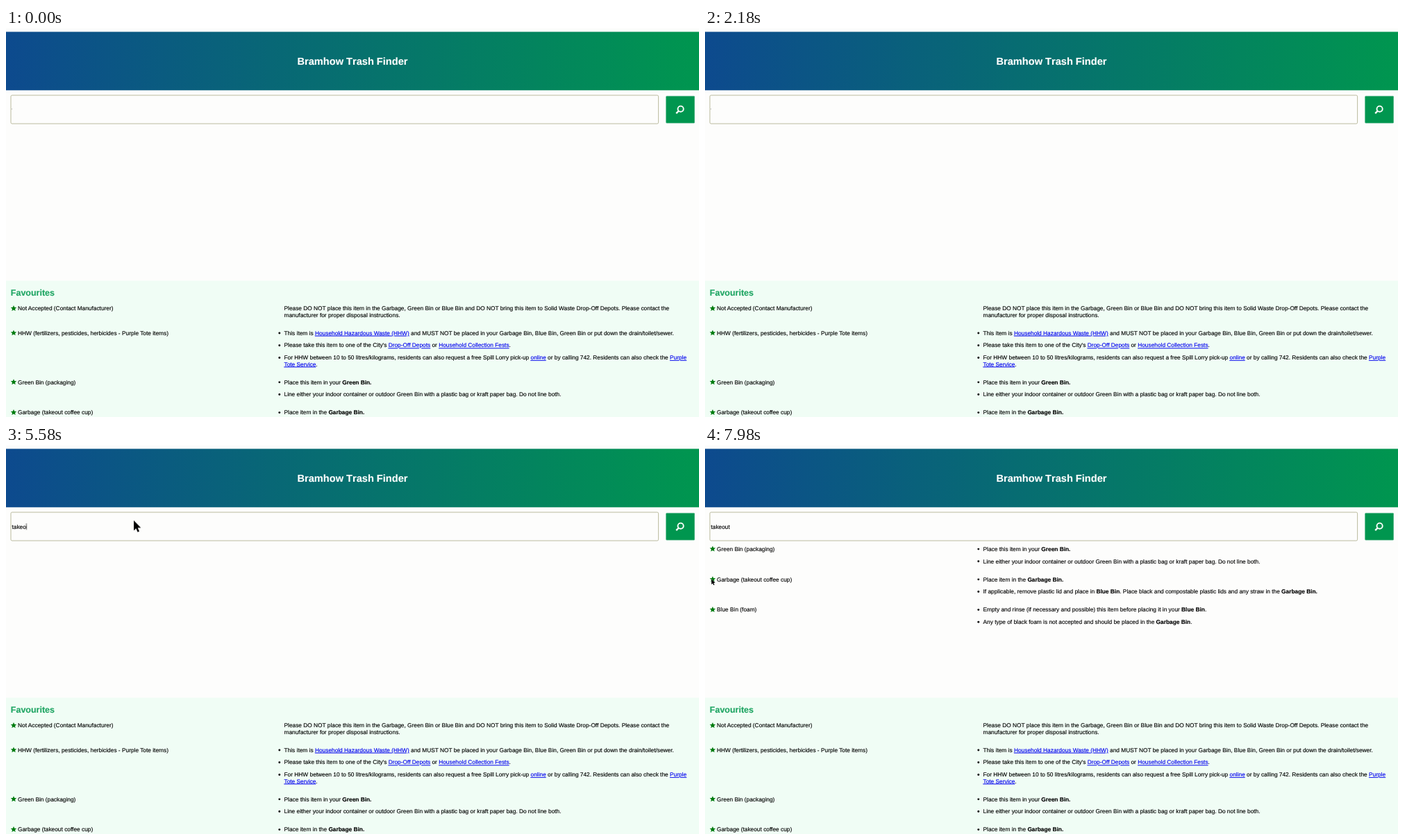
Write an HTML page that moves like this. It is 998 px wide and 561 px high and loops after 8000 ms.

```html
<!DOCTYPE html>
<html lang="en">
<head>
<meta charset="utf-8">
<title>Waste search</title>
<style>
  html, body { margin: 0; width: 100%; height: 100%; overflow: hidden; background: #fdfdfc; }
  svg { display: block; width: 998px; height: 561px; }
  text {
    font: 8.333px "Liberation Sans", Arial, sans-serif;
    text-rendering: geometricPrecision;
    white-space: pre;
    color: #000;
    fill: currentColor;
    stroke: currentColor;
    stroke-width: .14px;
  }
  tspan { fill: currentColor; stroke: currentColor; }
  .title, .heading { font-weight: bold; font-kerning: none; }
  .title { font-size: 14.6px; color: #fff; text-anchor: middle; }
  .heading { font-size: 12.5px; color: #1fa563; }
  .bold { font-weight: bold; }
  .link { color: #0000ee; text-decoration: underline; }
  .star { fill: #007c10; }

  #results { animation: results 8s step-end infinite; }
  #typing { animation: typing 8s step-end infinite; }
  #caret { animation: blink 8s step-end infinite; }
  #pointer { animation: move 8s ease-in-out infinite, show 8s step-end infinite; }

  @keyframes results { 0% { opacity: 0 } 78.75%, 100% { opacity: 1 } }

  /* each step is the advance width of the text typed so far */
  @keyframes typing {
    0% { transform: translateX(0) }
    50.5% { transform: translateX(2.4px) }
    54.5% { transform: translateX(7.1px) }
    58.5% { transform: translateX(11.3px) }
    61.5% { transform: translateX(15.9px) }
    66.5% { transform: translateX(20.6px) }
    71.5% { transform: translateX(25.2px) }
    74.5%, 100% { transform: translateX(27.6px) }
  }
  @keyframes blink {
    0% { opacity: 0 }
    35.5% { opacity: 1 }
    42% { opacity: 0 }
    48% { opacity: 1 }
    78.75%, 100% { opacity: 0 }
  }
  @keyframes show { 0% { opacity: 0 } 32%, 100% { opacity: 1 } }
  @keyframes move {
    0%, 32% { transform: translate(232px, 172px) scale(.52) }
    35%, 83% { transform: translate(184px, 108.8px) scale(1) }
    87%, 90.5% { transform: translate(202.7px, 156.1px) scale(.52) }
    98%, 100% { transform: translate(9.4px, 193.4px) scale(.52) }
  }
</style>
</head>
<body>
<svg viewBox="0 0 998 561">
  <defs>
    <linearGradient id="banner">
      <stop offset="0" stop-color="#0d4a8e"/>
      <stop offset="1" stop-color="#00964f"/>
    </linearGradient>
    <path id="star" class="star" d="M0-4.3 1.25-1.5 4.2-1.3 2 .7 2.65 3.6 0 2.1-2.65 3.6-2 .7-4.2-1.3-1.25-1.5Z"/>
  </defs>

  <rect width="998" height="561" fill="#fdfdfc"/>
  <rect y="5.5" width="998" height="84.3" fill="url(#banner)"/>
  <text class="title" x="499" y="52.6">Bramhow Trash Finder</text>

  <rect x="7" y="97" width="932.6" height="41" rx="1.8" fill="#fdfdfc" stroke="#b3b394" stroke-width=".9"/>
  <text x="8.5" y="120.6">takeout</text>
  <g id="typing">
    <rect x="8.9" y="110" width="32" height="15" fill="#fdfdfc"/>
    <path id="caret" d="M8.8 113V122.4" stroke="#222" stroke-width=".7"/>
  </g>

  <rect x="950.6" y="98.3" width="41" height="38.8" rx="1" fill="#00964f" stroke="#4db384" stroke-width=".7"/>
  <g fill="none" stroke="#fff" stroke-width="1.9">
    <circle cx="971.6" cy="116.7" r="4.1"/>
    <path d="M968.6 119.7 965.2 123.1" stroke-width="2.3"/>
  </g>

  <g id="results"></g>

  <rect y="364.5" width="998" height="197" fill="#f0fdf5"/>
  <text class="heading" x="6.8" y="386.3">Favourites</text>
  <g id="favourites"></g>

  <path id="pointer" d="M0 0V14.5L3.3 11.4 5.6 16.8 8 15.8 5.7 10.4H10.3Z"
        stroke="#fff" stroke-width="1" stroke-linejoin="round" paint-order="stroke"/>
</svg>
<script>
  const LINE = 9.376, PARAGRAPH = 17.71, ROW = 26.04;

  // Inline marks: *bold* and [link]
  const format = s => s
    .replace(/\*(.+?)\*/g, '<tspan class="bold">$1</tspan>')
    .replace(/\[(.+?)\]/g, '<tspan class="link">$1</tspan>');

  const textAt = (x, y, s) => `<text x="${x}" y="${y}">${format(s)}</text>`;

  // Each row is a label and its paragraphs; "|" breaks a line.
  function fill(id, y, rows, bulletless = -1) {
    let out = '';
    rows.forEach(([label, ...paragraphs], row) => {
      out += `<use href="#star" x="11" y="${y - 3}"/>` + textAt(17, y, label);
      paragraphs.forEach((paragraph, i) => {
        if (i) y += PARAGRAPH;
        if (row !== bulletless) out += `<circle cx="393.8" cy="${y - 2.7}" r="1.45"/>`;
        paragraph.split('|').forEach((line, j) => {
          if (j) y += LINE;
          out += textAt(400.5, y, line);
        });
      });
      y += ROW;
    });
    document.getElementById(id).innerHTML = out;
  }

  const greenBin = ['Green Bin (packaging)',
    'Place this item in your *Green Bin.*',
    'Line either your indoor container or outdoor Green Bin with a plastic bag or kraft paper bag. Do not line both.'];
  const garbage = ['Garbage (takeout coffee cup)',
    'Place item in the *Garbage Bin.*',
    'If applicable, remove plastic lid and place in *Blue Bin*. Place black and compostable plastic lids and any straw in the *Garbage Bin.*'];

  fill('results', 152.8, [
    greenBin,
    garbage,
    ['Blue Bin (foam)',
      'Empty and rinse (if necessary and possible) this item before placing it in your *Blue Bin*.',
      'Any type of black foam is not accepted and should be placed in the *Garbage Bin*.']
  ]);

  fill('favourites', 407.3, [
    ['Not Accepted (Contact Manufacturer)',
      'Please DO NOT place this item in the Garbage, Green Bin or Blue Bin and DO NOT bring this item to Solid Waste Drop-Off Depots. Please contact the|manufacturer for proper disposal instructions.'],
    ['HHW (fertilizers, pesticides, herbicides - Purple Tote items)',
      'This item is [Household Hazardous Waste (HHW)] and MUST NOT be placed in your Garbage Bin, Blue Bin, Green Bin or put down the drain/toilet/sewer.',
      'Please take this item to one of the City\'s [Drop-Off Depots] or [Household Collection Fests].',
      'For HHW between 10 to 50 litres/kilograms, residents can also request a free Spill Lorry pick-up [online] or by calling 742. Residents can also check the [Purple]|[Tote Service].'],
    greenBin,
    garbage
  ], 0);
</script>
</body>
</html>
```
